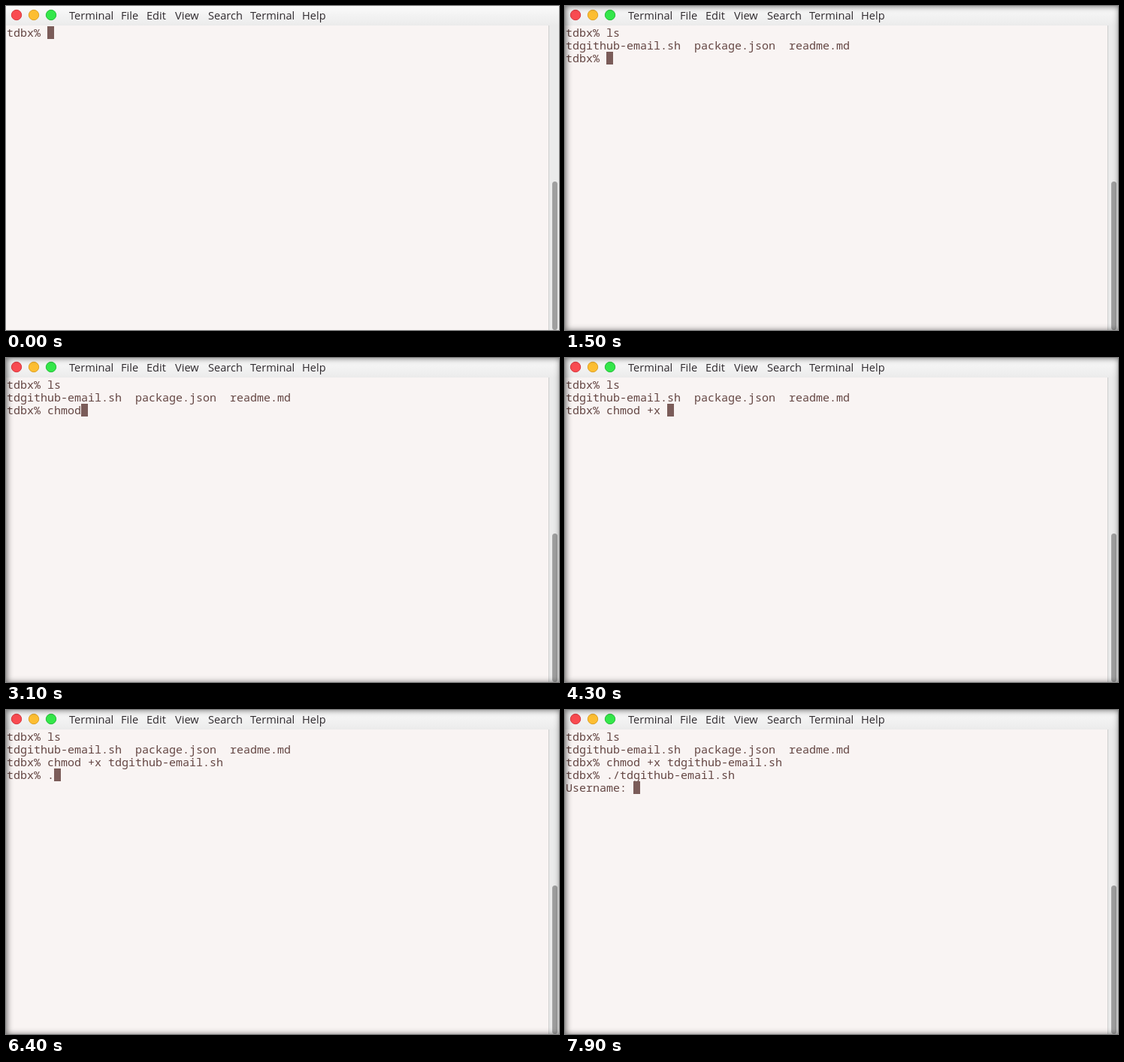
An HTML page with a canvas for the animation above (8 s loop, 736 by 432 pixels).

```html
<!DOCTYPE html>
<html lang="en">
<head>
<meta charset="utf-8">
<title>Terminal</title>
<style>
  html, body { margin: 0; width: 100%; height: 100%; overflow: hidden; background: #f9f4f3; }
  canvas { display: block; }
</style>
</head>
<body>
<canvas id="stage" width="736" height="432"></canvas>
<script>
const W = 736, H = 432, LOOP = 8000;
const ctx = document.getElementById('stage').getContext('2d');

const BAR = 26, CELL = 9, LINE = 17;
const INK = '#644643', BLOCK = '#7b5c59';
const PROMPT = 'tdbx% ', SCRIPT = 'tdgithub-email.sh';

const MENU = [['Terminal', 84], ['File', 153], ['Edit', 187], ['View', 225],
              ['Search', 269], ['Terminal', 325], ['Help', 394]];
const LIGHTS = [[14, '#f94b51', '#d83a40'], [37, '#fdbe32', '#dda127'], [60, '#34e74a', '#25bd38']];

// [time, text added to the screen]
const OUTPUT = [
  [0, PROMPT],
  [1100, 'l'], [1300, 's'],
  [1400, `\n${SCRIPT}  package.json  readme.md\n${PROMPT}`],
  [2300, 'c'], [2500, 'h'], [2700, 'm'], [2800, 'o'], [3000, 'd'],
  [3300, ' '], [3500, '+'], [3800, 'x'], [4000, ' '], [4500, SCRIPT[0]],
  [5300, SCRIPT.slice(1) + ' '],
  [5700, '\n' + PROMPT],
  [6200, '.'], [6500, '/'], [6800, SCRIPT[0]],
  [7300, SCRIPT.slice(1) + ' '],
  [7700, '\nUsername: ']
];
const BLINK_OFF = [[500, 1100], [2000, 2300]];

const within = (t, [from, to]) => t >= from && t < to;

function drawTitleBar() {
  const shade = ctx.createLinearGradient(0, 0, 0, BAR);
  shade.addColorStop(0, '#fafafa');
  shade.addColorStop(1, '#ebebeb');
  ctx.fillStyle = shade;
  ctx.fillRect(0, 0, W, BAR);

  ctx.lineWidth = 1;
  for (const [x, fill, edge] of LIGHTS) {
    ctx.beginPath();
    ctx.arc(x, 12, 6.7, 0, Math.PI * 2);
    ctx.fillStyle = fill;
    ctx.strokeStyle = edge;
    ctx.fill();
    ctx.stroke();
  }

  ctx.font = '14.6px "Open Sans", "Noto Sans", sans-serif';
  ctx.fillStyle = '#2f2a2e';
  for (const [label, x] of MENU) ctx.fillText(label, x, 18);
}

function drawScrollbar() {
  ctx.fillStyle = '#ebebeb';
  ctx.fillRect(722, BAR, 14, H - BAR);
  ctx.fillStyle = '#cdcdcd';
  ctx.fillRect(722, BAR, 1, H - BAR);
  ctx.fillStyle = '#9f9f9f';
  ctx.beginPath();
  ctx.roundRect(727, 234, 7, 198, 3.5);
  ctx.fill();
}

function drawScreen(t) {
  const text = OUTPUT.filter(([at]) => at <= t).map(([, s]) => s).join('');
  const lines = text.split('\n');
  ctx.font = '15px "Noto Sans Mono", "DejaVu Sans Mono", monospace';
  ctx.fillStyle = INK;
  lines.forEach((line, row) => ctx.fillText(line, 1, 41 + row * LINE));

  if (BLINK_OFF.some(span => within(t, span))) return;
  const row = lines.length - 1;
  ctx.fillStyle = BLOCK;
  ctx.fillRect(1 + lines[row].length * CELL, 27 + row * LINE, CELL, LINE);
}

function drawPointer(t) {
  if (!within(t, [400, 1100])) return;
  const k = Math.min(1, Math.floor((t - 400) / 100) / 2);
  ctx.save();
  ctx.translate(272 - 78 * k, 20 + 74 * k);
  ctx.shadowColor = 'rgba(0,0,0,.4)';
  ctx.shadowBlur = 3;
  ctx.shadowOffsetX = ctx.shadowOffsetY = 2;
  ctx.beginPath();
  ctx.moveTo(-3.5, -7.5); ctx.lineTo(3.5, -7.5);
  ctx.moveTo(0, -7.5); ctx.lineTo(0, 7.5);
  ctx.moveTo(-3.5, 7.5); ctx.lineTo(3.5, 7.5);
  ctx.moveTo(-2, 0); ctx.lineTo(2, 0);
  ctx.strokeStyle = '#f4f2f2';
  ctx.lineWidth = 3;
  ctx.stroke();
  ctx.shadowColor = 'transparent';
  ctx.strokeStyle = '#4c4848';
  ctx.lineWidth = 1.2;
  ctx.stroke();
  ctx.restore();
}

// Soft inner shadow, cast by a ring lying outside the stage
function drawVignette() {
  ctx.save();
  ctx.shadowColor = 'rgba(0,0,0,.6)';
  ctx.shadowBlur = 8;
  ctx.shadowOffsetX = 1;
  ctx.fillStyle = '#000';
  ctx.beginPath();
  ctx.rect(-30, -30, W + 60, H + 60);
  ctx.rect(0, 0, W + 1, H + 1);
  ctx.fill('evenodd');
  ctx.restore();
}

function draw(t) {
  ctx.fillStyle = '#f9f4f3';
  ctx.fillRect(0, 0, W, H);
  drawTitleBar();
  drawScrollbar();
  drawScreen(t);
  drawPointer(t);
  if (t >= 100) drawVignette();
}

const start = performance.now();
function tick() {
  draw((performance.now() - start) % LOOP);
  requestAnimationFrame(tick);
}
tick();
</script>
</body>
</html>
```
